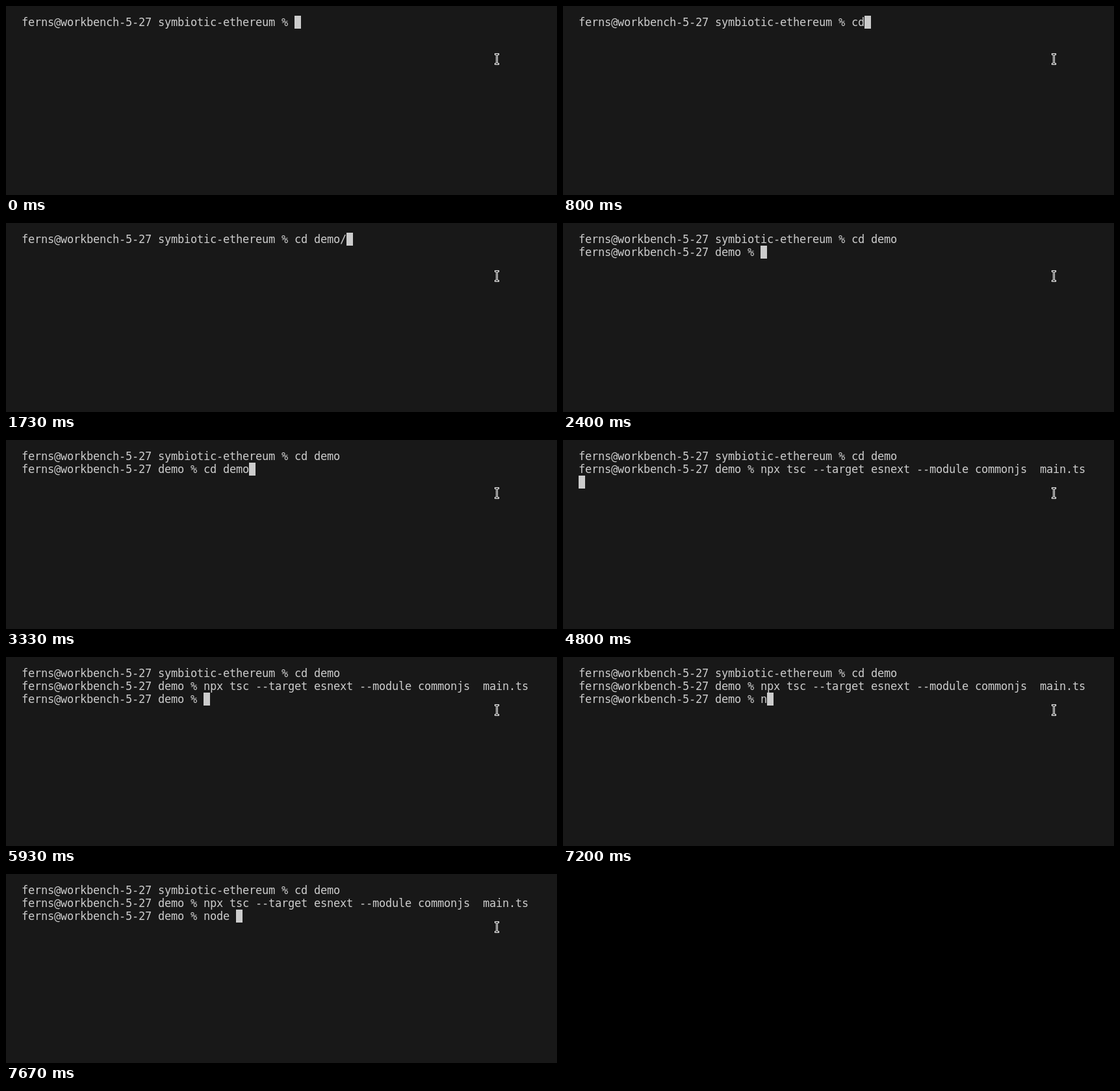
Write an HTML page that moves like this. It is 848 px wide and 292 px high and loops after 8 s.

```html
<!DOCTYPE html>
<html lang="en">
<head>
<meta charset="utf-8">
<title>Terminal session</title>
<style>
  html, body { margin: 0; width: 100%; height: 100%; overflow: hidden; background: #181818; }
  pre {
    position: absolute; left: 24px; top: 15px; margin: 0;
    font: 17px/20px "DejaVu Sans Mono", monospace; color: #ccc;
  }
  #caret { position: absolute; width: 10px; height: 20px; background: #ccc; }
  svg { position: absolute; left: 750px; top: 71px; }
</style>
</head>
<body>
<pre id="screen"></pre>
<div id="caret"></div>
<svg width="12" height="21">
  <path d="M2 3.5H9M5.5 3.5V18.5M2 18.5H9" stroke="#fff" stroke-width="3"/>
  <path d="M3 3.5H8M5.5 3.5V18.5M3 18.5H8" stroke="#181818"/>
</svg>
<script>
const LOOP = 8000, CELL = 10, LINE = 20, LEFT = 24, TOP = 15;
const user = 'ferns@workbench-5-27 ';
const home = user + 'symbiotic-ethereum % ';
const demo = user + 'demo % ';
const build = 'npx tsc --target esnext --module commonjs  main.ts';
const line1 = home + 'cd demo\n';
const line2 = line1 + demo + build + '\n';

// [start ms, screen text, caret hidden]; the caret follows the last character
const steps = [
  [0, home],
  [800, home + 'cd'],
  [870, home + 'cd '],
  [1330, home + 'cd d'],
  [1470, home + 'cd de'],
  [1730, home + 'cd demo/'],
  [2400, line1 + demo],
  [3270, line1 + demo + 'cd dem'],
  [3330, line1 + demo + 'cd demo'],
  [4200, line1 + demo + build.slice(0, -1)],
  [4270, line1 + demo + build],
  [4730, line2, true],
  [4800, line2],
  [5930, line2 + demo],
  [7200, line2 + demo + 'n'],
  [7270, line2 + demo + 'no'],
  [7400, line2 + demo + 'nod'],
  [7530, line2 + demo + 'node'],
  [7670, line2 + demo + 'node ']
];

const screenEl = document.getElementById('screen');
const caret = document.getElementById('caret');
let shown;

// Snap the font's natural advance to the terminal's whole-pixel cell
screenEl.textContent = home;
const advance = screenEl.getBoundingClientRect().width / home.length;
screenEl.style.letterSpacing = CELL - advance + 'px';

function draw(now) {
  const t = now % LOOP;
  const step = steps.findLast(s => s[0] <= t) || steps[0];
  if (step !== shown) {
    shown = step;
    const [, text, hidden] = step;
    const rows = text.split('\n');
    screenEl.textContent = text;
    caret.style.left = LEFT + rows.at(-1).length * CELL + 'px';
    caret.style.top = TOP + (rows.length - 1) * LINE + 'px';
    caret.hidden = !!hidden;
  }
  requestAnimationFrame(draw);
}
draw(0);
</script>
</body>
</html>
```
